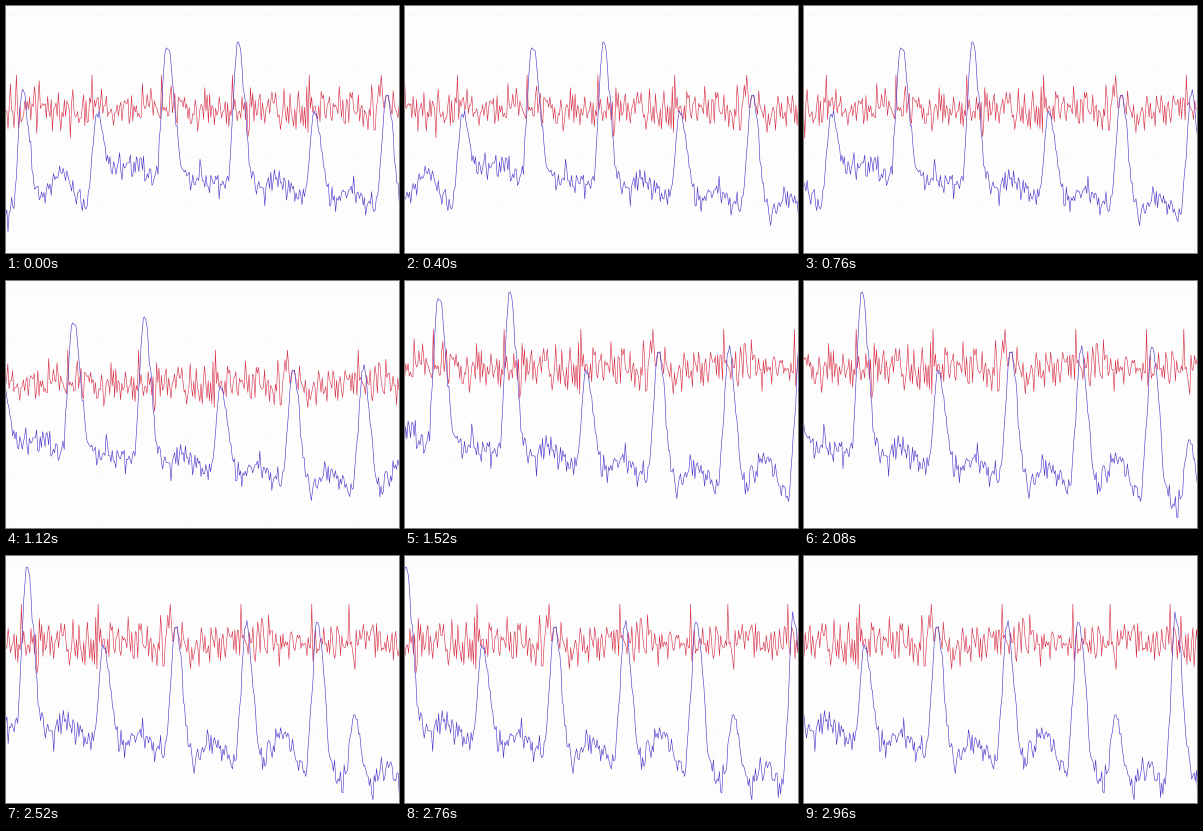
These frames come from a looping animation (393x247 px, 3 s). A matplotlib script:

```python
import numpy as np
import matplotlib.pyplot as plt
from matplotlib.animation import FuncAnimation

W, H, DPI = 393, 247, 100
FRAMES, STEP = 75, 40
SPEED = 3.35            # pixels scrolled per step
RESCALE_MS = 1320
ZOOM, DROP = 1.125, 29.5
RED_MID = 103

rng = np.random.default_rng(12)
xs = np.arange(-4, 650, 1.2)

# Each beat: crest position, crest height, foot before it, swell after it
BEATS = [(16.5, 83, 214, 166), (91.5, 106, 203, 153), (161, 38, 175, 171),
         (232, 36, 181, 172), (308.5, 106, 198, 186), (380.5, 89, 204, 185),
         (451, 86, 217, 184), (522.5, 83, 217, 228), (559, 168, 236, 210),
         (619.5, 78, 236, 210)]


def bump(d):
    """Fast rise, slower fall."""
    return np.exp(-(d / np.where(d < 0, 6.5, 9.5)) ** 2)


def noise(sd, limit):
    """Mostly even noise with a few strong deflections."""
    gain = np.where(rng.random(xs.size) < .05, 1.7, 1)
    return np.clip(rng.normal(0, sd, xs.size) * gain, -limit, limit)


def resting_level():
    knots = []
    for beat, after in zip(BEATS, BEATS[1:] + BEATS[-1:]):
        pos, _, foot, swell = beat
        notch = pos + 20
        knots += [(pos - 11, foot), (notch, after[2] - 10)]
        if after is not beat:
            knots.append((notch + .4 * (after[0] - 11 - notch), swell))
    return np.interp(xs, *zip(*knots))


def pulse_trace():
    y = resting_level()
    calm = np.ones_like(xs)
    for pos, crest, *_ in BEATS:
        b = bump(xs - pos)
        y += (crest - y) * b
        calm = np.minimum(calm, 1 - .6 * b)
    return np.clip(y + noise(6.5, 18) * calm, 36, 243)


def noise_trace():
    y = RED_MID + noise(10, 29)
    for pos, *_ in BEATS:
        y[np.abs(xs - pos + 5.5).argmin()] = RED_MID - 34
    return y


blue_y, red_y = pulse_trace(), noise_trace()

fig = plt.figure(figsize=(W / DPI, H / DPI), dpi=DPI, facecolor="#fdfdfd")
ax = fig.add_axes([0, 0, 1, 1])
ax.set(xlim=(0, W), ylim=(H, 0))
ax.axis("off")
ax.axhline(9, color="#f8f8f8", lw=.72)


def grid(cols, rows):
    style = dict(color="#f6f6f6", lw=.72, ls=(0, (1, 2)))
    return ([ax.axvline(x, ymax=1 - 9 / H, **style) for x in cols]
            + [ax.axhline(y, **style) for y in rows])


fine_grid = grid(np.arange(6, W, 86.2), np.arange(58, H, 46.3))
wide_grid = grid(np.arange(50, W, 129), np.arange(92, H, 83))
red, = ax.plot([], [], color="#d82c44", lw=.42)
blue, = ax.plot([], [], color="#4634cc", lw=.42)


def update(i):
    zoomed = i * STEP >= RESCALE_MS
    for line, y in ((red, red_y), (blue, blue_y)):
        line.set_data(xs - i * SPEED, y * ZOOM - DROP if zoomed else y)
    for g in fine_grid:
        g.set_visible(not zoomed)
    for g in wide_grid:
        g.set_visible(zoomed)
    return [red, blue, *fine_grid, *wide_grid]


anim = FuncAnimation(fig, update, frames=FRAMES, interval=STEP,
                     repeat=True, repeat_delay=0)
plt.show()
```
